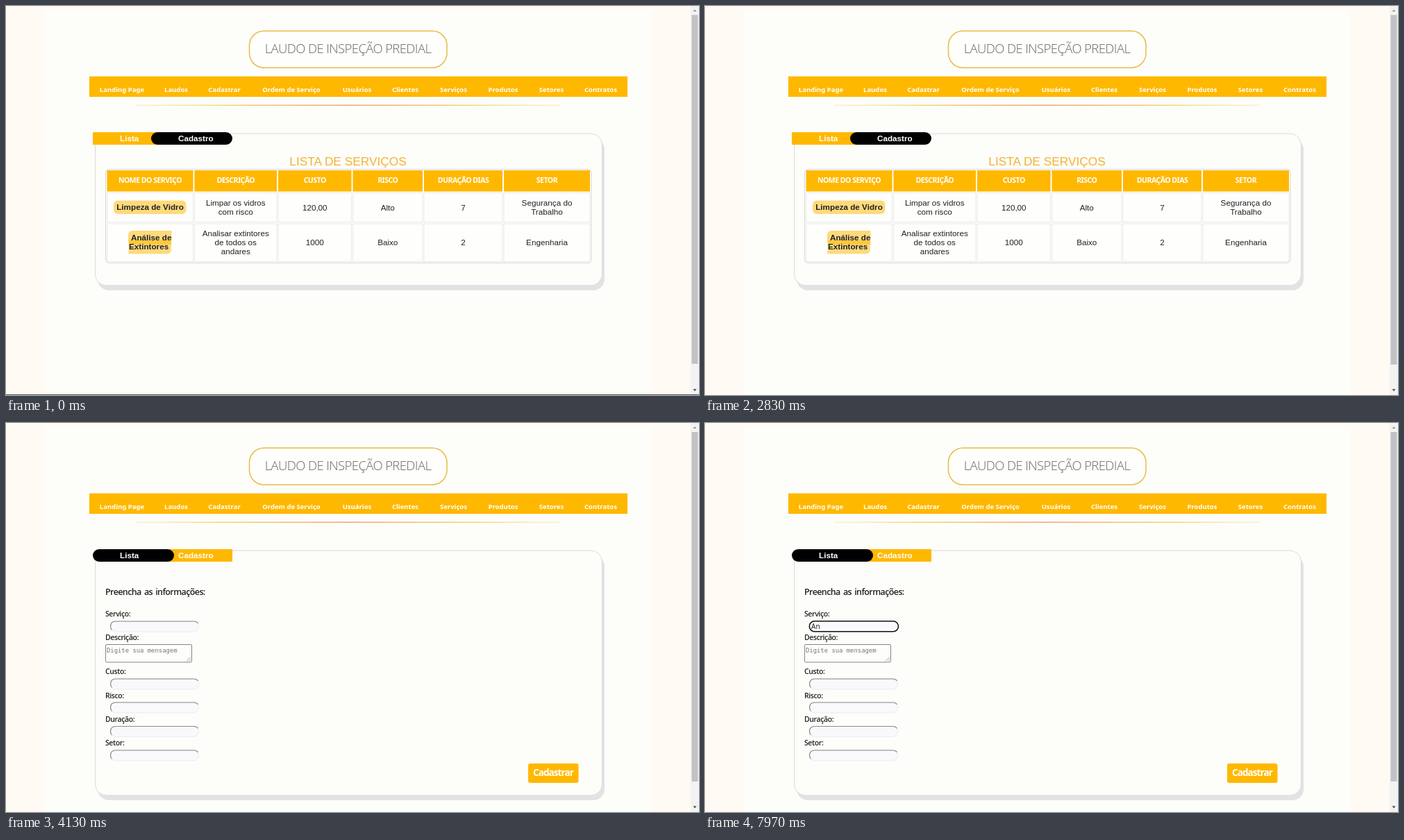
An HTML page for the animation above (8000 ms loop, 998 by 561 pixels).

```html
<!DOCTYPE html>
<html lang="pt-BR">
<head>
<meta charset="utf-8">
<title>Laudo de Inspeção Predial</title>
<style>
  html, body { margin: 0; width: 100%; height: 100%; overflow: hidden; background: #fffaf3; }
  svg { display: block; width: 998px; height: 561px; }
  text { white-space: pre; }

  .ui { font-family: "Noto Sans", "Open Sans", sans-serif; }
  .open { font-family: "Open Sans", "Noto Sans", sans-serif; }
  .arial { font: 11.7px "Liberation Sans", Arial, sans-serif; fill: #222; }
  .mid { text-anchor: middle; }
  .bold { font-weight: 700; }
  .gold { fill: #ffb800; }
  .title { font-size: 18.5px; font-weight: 300; letter-spacing: -.6px; fill: #666; }
  .nav { font-size: 9.5px; font-weight: 700; fill: #fff; }
  .head { font-size: 10.5px; font-weight: 600; letter-spacing: -.5px; fill: #fff; }
  .intro { font-size: 12.5px; font-weight: 600; letter-spacing: -.6px; word-spacing: 1.5px; fill: #222; }
  .label { font-size: 10.5px; font-weight: 600; letter-spacing: -.4px; fill: #222; }
  .submit { font-size: 13.5px; font-weight: 600; letter-spacing: -.9px; fill: #fff; }
  .hint { font: 8.9px "DejaVu Sans Mono", monospace; fill: #777; }
  .typed { font-size: 10px; fill: #222; }
  .cell { fill: none; stroke: #e9e9e9; }
  .mark { fill: #ffb800; fill-opacity: .5; }
  .tab { font: 700 11.7px "Liberation Sans", Arial, sans-serif; fill: #fff; }

  .timed { animation: 8s step-end infinite; }
  #edge { animation-name: edge; }
  #list { animation-name: until-switch; }
  #form { animation-name: from-switch; }
  #focus { animation-name: focus; }
  #letterA { animation-name: letter-a; }
  #letterN { animation-name: letter-n; }
  #caret { animation-name: blink; }
  #thumb { animation-name: thumb; }
  #listTab { animation: darken 8s infinite; }

  @keyframes edge { 0% { opacity: 1 } .375%, 100% { opacity: 0 } }
  @keyframes thumb { 0% { height: 503px } .375%, 100% { height: 504px } }
  @keyframes until-switch { 0% { opacity: 1 } 41.625%, 100% { opacity: 0 } }
  @keyframes from-switch { 0% { opacity: 0 } 41.625%, 100% { opacity: 1 } }
  @keyframes darken {
    0%, 41.625% { fill: #ffb800; rx: 0px; animation-timing-function: ease }
    46.625%, 100% { fill: #000; rx: 9px }
  }
  @keyframes focus { 0% { opacity: 0 } 67.5%, 100% { opacity: 1 } }
  @keyframes letter-a { 0% { opacity: 0 } 88.75%, 100% { opacity: 1 } }
  @keyframes letter-n { 0% { opacity: 0 } 91.875%, 100% { opacity: 1 } }
  @keyframes blink {
    0% { opacity: 0; transform: none }
    67.5% { opacity: 1; transform: none }
    73.75% { opacity: 0; transform: none }
    80% { opacity: 1; transform: none }
    86.25% { opacity: 0; transform: none }
    88.75% { opacity: 1; transform: translateX(7px) }
    91.875% { opacity: 1; transform: translateX(13px) }
    98.125%, 100% { opacity: 0; transform: translateX(13px) }
  }
</style>
</head>
<body>
<svg viewBox="0 0 998 561">
  <defs>
    <linearGradient id="rule">
      <stop offset="0" stop-color="#ffe08a" stop-opacity=".5"/>
      <stop offset=".2" stop-color="#f8cf5c"/>
      <stop offset=".5" stop-color="#e99a55"/>
      <stop offset=".8" stop-color="#f8cf5c"/>
      <stop offset="1" stop-color="#ffe08a" stop-opacity=".5"/>
    </linearGradient>
  </defs>

  <rect width="998" height="561" fill="#fffaf3"/>
  <rect x="55" y="5" width="875" height="556" fill="#fdfdfa"/>

  <rect x="350.5" y="36" width="284.5" height="53" rx="21" fill="#fefefc" stroke="#e9bc48" stroke-width="1.5"/>
  <text class="open title mid" x="492.5" y="67.5">LAUDO DE INSPEÇÃO PREDIAL</text>
  <rect class="gold" x="120" y="101.5" width="775" height="29.5"/>
  <g id="nav"></g>
  <rect x="186" y="142.5" width="613" height="1.3" fill="url(#rule)"/>

  <g id="list" class="timed">
    <g class="card" data-height="219"></g>
    <text class="arial mid" x="492.5" y="230" style="font-size:17.3px;fill:#f2b233">LISTA DE SERVIÇOS</text>
    <rect x="143.5" y="235.5" width="699.5" height="135" rx="5" fill="#fefefc" stroke="#d6d6d6"/>
    <g id="table"></g>
    <rect class="mark" x="155" y="280.5" width="104.5" height="19.5" rx="6"/>
    <path class="mark" d="M238.5 324 H182 a6 6 0 0 0 -6 6 v8 a6 6 0 0 0 6 6 H238.5 Z"/>
    <path class="mark" d="M176.5 337.5 H232 a6 6 0 0 1 6 6 v8 a6 6 0 0 1 -6 6 H176.5 Z"/>
    <text class="arial bold mid" x="207.5" y="294">Limpeza de Vidro</text>
    <text class="arial bold" x="180" y="338">Análise de</text>
    <text class="arial bold" x="177" y="351">Extintores</text>
    <rect class="gold" x="125" y="182" width="117" height="18"/>
    <rect x="209" y="182" width="117" height="18" rx="9"/>
  </g>

  <g id="form" class="timed">
    <g class="card" data-height="353"></g>
    <text class="open intro" x="143" y="247.5">Preencha as informações:</text>
    <g id="fields"></g>
    <rect x="143.5" y="319.5" width="124" height="25.5" rx="1.5" fill="#fdfdfc" stroke="#858585"/>
    <path d="M260 343.5 l6 -6 M263.5 343.5 l2.5 -2.5" stroke="#888" stroke-width=".8"/>
    <text class="hint" x="145" y="330.5">Digite sua mensagem</text>
    <rect class="gold" x="752" y="491" width="72.5" height="28" rx="3"/>
    <text class="ui submit mid" x="788" y="508.5">Cadastrar</text>
    <rect class="gold" x="209" y="182" width="117" height="18"/>
    <rect id="listTab" x="125" y="182" width="117" height="18"/>
    <rect id="focus" class="timed" x="150.3" y="285.8" width="128.2" height="15" rx="7.5" fill="#fafafc" stroke="#111" stroke-width="1.6"/>
    <text id="letterA" class="ui typed timed" x="153" y="297">A</text>
    <text id="letterN" class="ui typed timed" x="159.5" y="297">n</text>
    <rect id="caret" class="timed" x="152.5" y="288" width="1" height="11" fill="#111"/>
  </g>

  <text class="tab" x="164" y="195">Lista</text>
  <text class="tab" x="248" y="195">Cadastro</text>

  <rect x="986" width="12" height="561" fill="#f3f3f3"/>
  <rect id="thumb" class="timed" x="987.5" y="13" width="9" height="504" fill="#c2c2c6"/>
  <path d="M989.5 8 l2.5 -3 l2.5 3 Z" fill="#999"/>
  <path d="M989.5 552.5 l2.5 3 l2.5 -3 Z" fill="#444"/>
  <rect id="edge" class="timed" y="560" width="998" height="1" fill="#555"/>
</svg>

<script>
  const byId = id => document.getElementById(id);
  const label = (cls, x, y, s) => `<text class="${cls}" x="${x}" y="${y}">${s}</text>`;
  const box = (x, y, w, h, attrs) => `<rect x="${x}" y="${y}" width="${w}" height="${h}" ${attrs}/>`;

  const menu = [["Landing Page", 167], ["Laudos", 245], ["Cadastrar", 314.5], ["Ordem de Serviço", 411],
    ["Usuários", 505.5], ["Clientes", 575], ["Serviços", 644.5], ["Produtos", 716], ["Setores", 785.5], ["Contratos", 856.5]];
  byId("nav").innerHTML = menu.map(([s, x]) => label("ui nav mid", x, 123.5, s)).join("");

  document.querySelectorAll(".card").forEach(card => {
    const h = +card.dataset.height;
    card.innerHTML = box(132, 191, 730, h, 'rx="16" fill="#e3e3e6"') +
      box(128.5, 184, 730, h, 'rx="16" fill="#fdfdfa" stroke="#dcdad6"');
  });

  // Each column: left, right, heading, first row lines, second row lines
  const columns = [
    [145.5, 269.5, "NOME DO SERVIÇO", [], []],
    [271.5, 390, "DESCRIÇÃO", ["Limpar os vidros", "com risco"], ["Analisar extintores", "de todos os", "andares"]],
    [392, 497.5, "CUSTO", ["120,00"], ["1000"]],
    [499.5, 600, "RISCO", ["Alto"], ["Baixo"]],
    [602, 715, "DURAÇÃO DIAS", ["7"], ["2"]],
    [717, 841, "SETOR", ["Segurança do", "Trabalho"], ["Engenharia"]]
  ];
  const lines = (x, middle, rows) => rows.map((s, i) =>
    label("arial mid", x, middle + 4 + 13 * (i - (rows.length - 1) / 2), s)).join("");
  byId("table").innerHTML = columns.map(([left, right, name, first, second]) => {
    const w = right - left, x = (left + right) / 2;
    return box(left, 237, w, 30.5, 'class="gold"') + label("ui head mid", x, 255, name) +
      box(left, 269.5, w, 42, 'class="cell"') + lines(x, 290.5, first) +
      box(left, 314, w, 54.5, 'class="cell"') + lines(x, 341, second);
  }).join("");

  const input = y => box(150.5, y, 127, 15, 'rx="7.5" fill="#f9f9fc" stroke="#ececf0"') +
    `<path d="M152.5 ${y + 12.5} Q150.5 ${y + 10.5} 150.5 ${y + 7.5} Q150.5 ${y} 158 ${y} H270 Q275 ${y} 276.5 ${y + 3}" fill="none" stroke="#8a8a8a" stroke-width="1.2"/>`;
  const fields = [["Serviço:", 279, 286], ["Descrição:", 313], ["Custo:", 362, 369],
    ["Risco:", 396.5, 403], ["Duração:", 431, 437.5], ["Setor:", 465, 472]];
  byId("fields").innerHTML = fields.map(([s, y, top]) =>
    label("open label", 143, y, s) + (top ? input(top) : "")).join("");
</script>
</body>
</html>
```
